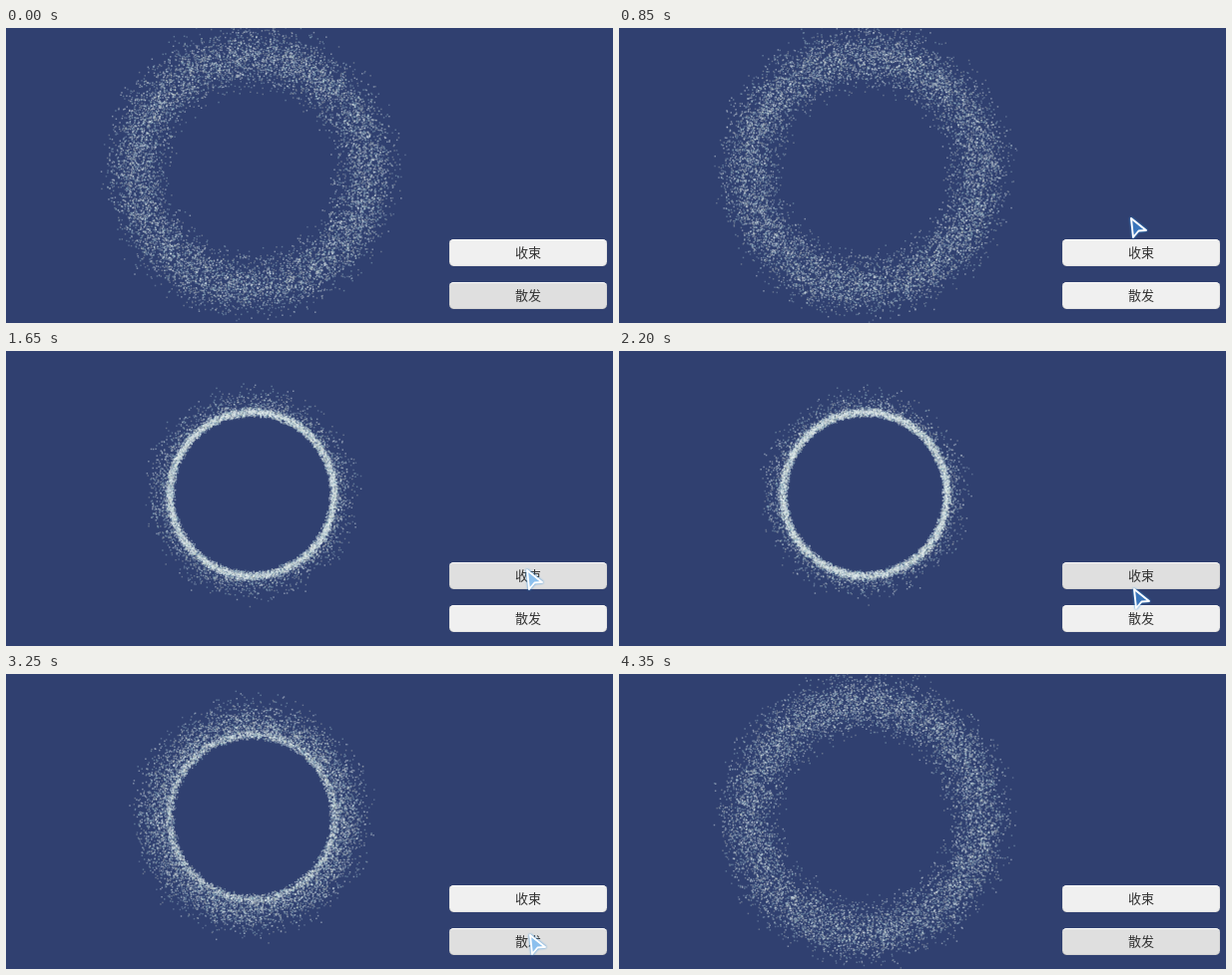
These frames come from a looping animation (608 by 296 pixels, 4.4 s). An HTML page with a canvas:

```html
<!DOCTYPE html>
<html lang="zh-CN">
<meta charset="utf-8">
<style>
  html, body { margin: 0; width: 608px; height: 296px; overflow: hidden; background: #304070; }
  body { position: relative; }
  canvas { position: absolute; left: 0; top: 0; }
  .btn {
    position: absolute; left: 444px; width: 158px; height: 27px; border-radius: 4.5px;
    font: 500 13px/25px "Noto Sans CJK SC", "Noto Sans CJK", sans-serif;
    text-align: center; color: #323232;
    box-shadow: inset 0 1px 0 #fafafa, inset 0 0 1px #0008;
  }
  svg { position: absolute; left: 0; top: 0; overflow: visible; filter: drop-shadow(0 0 1.2px #2f8fe0); }
</style>
<canvas id="stage" width="608" height="296"></canvas>
<div class="btn" id="gather" style="top:212px">收束</div>
<div class="btn" id="scatter" style="top:255px">散发</div>
<svg id="cursor" width="20" height="24">
  <path d="M1 1L16 13L8.5 13.5L3 20Z" stroke="#fff" stroke-width="1.9" stroke-linejoin="round"/>
</svg>
<script>
const LOOP = 4400, STEP = 50, COUNT = 9500, CX = 246.5, CY = 143.5;
const $ = id => document.getElementById(id);
const ctx = $('stage').getContext('2d');
const arrow = $('cursor').firstElementChild;

let seed = 7;
const rnd = () => (seed = (seed * 16807) % 2147483647) / 2147483647;
const ramp = (t, start, span) => Math.min(1, Math.max(0, (t - start) / span));

const colors = ['#bcd4e048', '#b4d8dc58', '#d4dccc50', '#e4ecf070'];
const dots = Array.from({ length: COUNT }, (_, i) => ({
  color: colors[Math.floor(i * 4 / COUNT)],
  angle: rnd() * Math.PI * 2,
  spin: (rnd() < .5 ? -1 : 1) * (.03 + rnd() * .15),
  wide: 117 + (rnd() + rnd() + rnd() - 1.5) * 28,
  tight: 82 + (rnd() + rnd() - 1) * 5,
  phase: rnd() * 7
}));

// time, x, y of the pointer tip
const path = [
  [100, 530, 272], [350, 517, 205], [550, 504, 186], [850, 512, 190], [1000, 521, 219],
  [1980, 521, 219], [2200, 515, 238], [2500, 524, 261], [4000, 524, 261]
];

function pointer(t) {
  const k = Math.max(1, path.findIndex(p => p[0] >= t));
  const [a, b] = [path[k - 1], path[k]];
  const u = ramp(t, a[0], b[0] - a[0]), e = u * u * (3 - 2 * u);
  return [a[1] + (b[1] - a[1]) * e, a[2] + (b[2] - a[2]) * e];
}

function shade(id, dark) {
  const v = Math.round(240 - 17 * dark);
  $(id).style.background = `rgb(${v},${v},${v})`;
}

function drawDots(t) {
  const shift = 45 * (ramp(t, 1020, 660) - ramp(t, 2940, 860));
  ctx.clearRect(0, 0, 608, 296);
  for (const d of dots) {
    ctx.fillStyle = d.color;
    const r = Math.max(Math.min(d.wide, d.tight), d.wide - shift) + .6 * Math.sin(t / 500 + d.phase);
    const a = d.angle + d.spin * t / 1000;
    ctx.fillRect(CX + r * Math.cos(a) - .75, CY + r * Math.sin(a) - .75, 1.5, 1.5);
  }
}

function drawPointer(t) {
  const shown = t >= 100 && t <= 4000;
  $('cursor').style.display = shown ? '' : 'none';
  if (!shown) return;
  const [x, y] = pointer(t);
  const hover = (y > 212 && y < 237) || y > 255;
  $('cursor').style.transform = `translate(${x}px,${y}px)`;
  arrow.setAttribute('fill', hover ? '#8cc0ee' : '#3a76bc');
}

const begin = performance.now();
function frame() {
  const t = Math.floor((performance.now() - begin) % LOOP / STEP) * STEP;
  drawDots(t);
  drawPointer(t);
  shade('gather', ramp(t, 930, 100) - ramp(t, 2880, 100));
  shade('scatter', 1 - ramp(t, 180, 100) + ramp(t, 2500, 100));
  requestAnimationFrame(frame);
}
frame();
</script>
</html>
```
